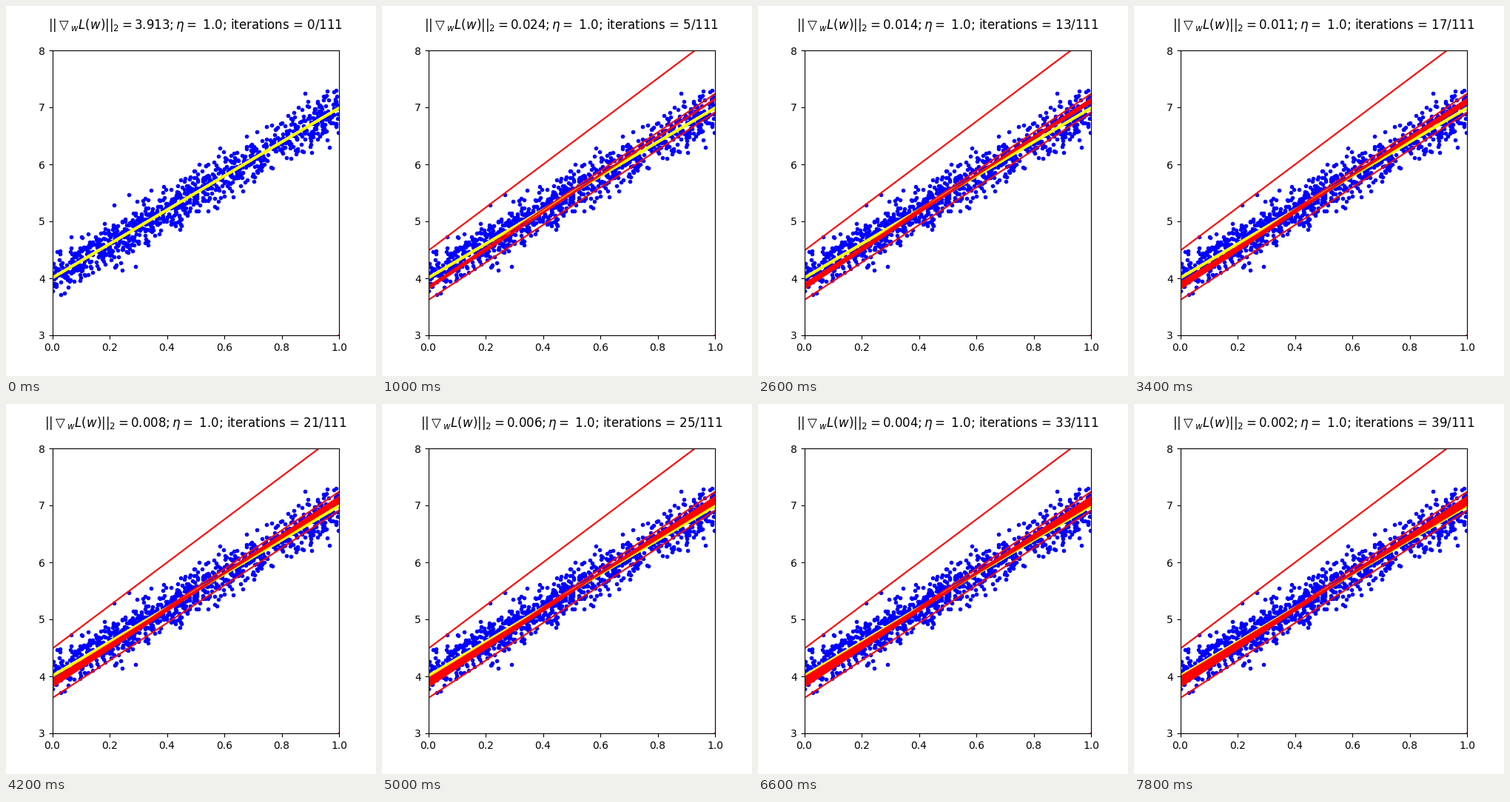
A matplotlib script that plays this animation: 500 by 500 pixels, repeating every 8000 ms.

```python
import numpy as np
import matplotlib.pyplot as plt
from matplotlib.animation import FuncAnimation

FRAMES, INTERVAL = 40, 200
ETA, TOTAL = 1.0, 111
START = np.array([1.0, 2.0])

# Whole-pixel kerning for tick labels and title.
plt.rcParams["text.kerning_factor"] = 6


def cloud(n=1000):
    np.random.seed(2)
    x = np.random.rand(n)
    return x, 4 + 3 * x + 0.2 * np.random.randn(n)


def descend(design, y, steps):
    """Weights and gradient norms of plain gradient descent."""
    w, path, norms = START, [], []
    for _ in range(steps):
        grad = design.T @ (design @ w - y) / len(y)
        path.append(w)
        norms.append(np.linalg.norm(grad))
        w = w - ETA * grad
    return path, norms


def draw_line(w, **style):
    return ax.plot([0, 1], [w[0], w[0] + w[1]], **style)[0]


x, y = cloud()
design = np.column_stack([np.ones_like(x), x])
best = np.linalg.lstsq(design, y, rcond=None)[0]
path, norms = descend(design, y, FRAMES)

fig, ax = plt.subplots(figsize=(5, 5), dpi=100)
fig.subplots_adjust(left=0.125, right=0.9, bottom=0.11, top=0.88)
ax.set_xlim(0, 1)
ax.set_ylim(3, 8)
ax.plot(x, y, "b.")
draw_line(best, color="yellow", linewidth=3)
lines = [draw_line(w, color="red", linewidth=1.5) for w in path]
title = ax.set_title("", fontsize=12, pad=20.88)


def update(k):
    for i, line in enumerate(lines):
        line.set_visible(i <= k)
    title.set_text(
        rf"$||\bigtriangledown_w L(w)||_2 = {norms[k]:.3f}; \eta = $ {ETA}; "
        f"iterations = {k}/{TOTAL}")
    return lines + [title]


anim = FuncAnimation(fig, update, frames=FRAMES, interval=INTERVAL,
                     init_func=lambda: update(0), repeat=True, repeat_delay=0)
plt.show()
```
